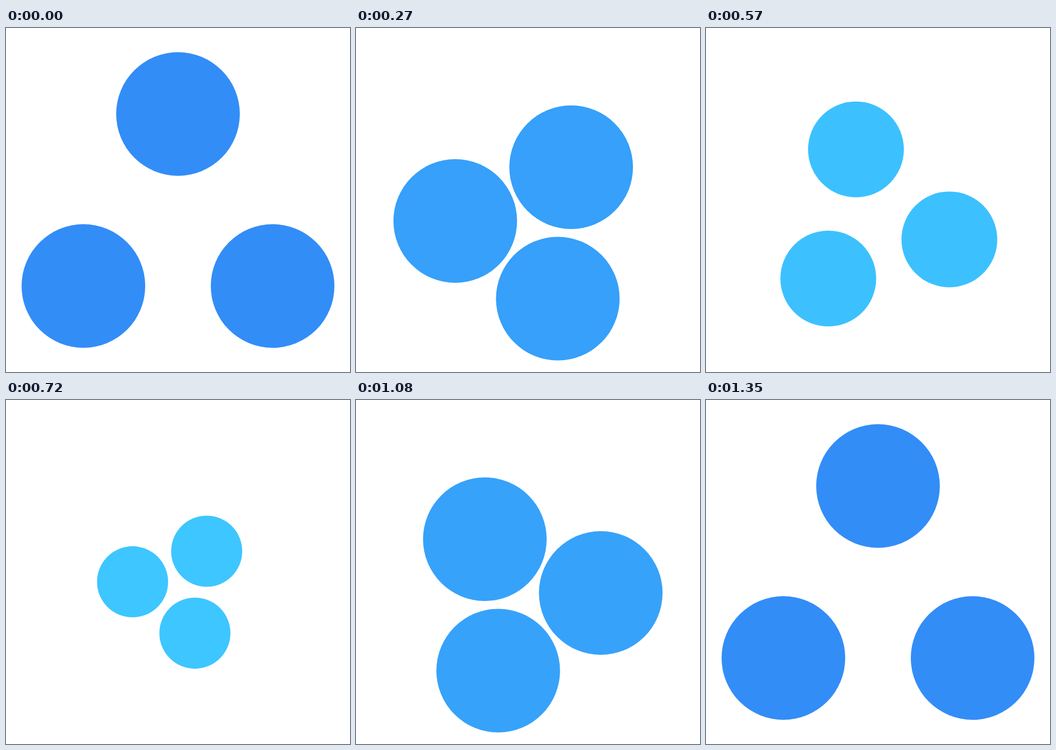
Animation, 640 px wide and 640 px high, one loop 1.38 s. Source, as an HTML page:

```html
<!DOCTYPE html>
<html lang="en">
<head>
<meta charset="utf-8">
<title>Three orbiting dots</title>
<style>
  html, body { margin: 0; width: 100%; height: 100%; overflow: hidden; background: #fff; }
  svg { display: block; width: 100%; height: 100%; }
</style>
</head>
<body>
<svg viewBox="0 0 640 640"><g id="dots"></g></svg>
<script>
const NS = 'http://www.w3.org/2000/svg';
const STEP = 30, LOOP = 1380, LEG = 15, LEGS = 3, PEAK = 23, END = LEG * LEGS;
const corners = [[320, 160], [144, 480], [496, 480]];
const darkBlue = [51, 141, 247], lightBlue = [61, 198, 255];
const group = document.getElementById('dots');

const corner = i => corners[(i + 3) % 3];
const ease = t => t * t * (3 - 2 * t);
const mix = (a, b, t) => a + (b - a) * t;

// Eased rise from `from` to PEAK and back down at `to`, 0..1..0
function pulse(frame, from, to) {
  const t = frame < PEAK ? (frame - from) / (PEAK - from) : (to - frame) / (to - PEAK);
  return ease(Math.min(1, Math.max(0, t)));
}

// Handle point on the smooth tangent through corner i
function handle(i, sign) {
  const prev = corner(i - 1), next = corner(i + 1);
  return corner(i).map((v, k) => v + sign * (next[k] - prev[k]) / 6);
}

// Curve from corner i to the next; the first and last legs have one straight end
function makeLeg(i, leg) {
  const path = document.createElementNS(NS, 'path');
  const out = leg > 0 ? handle(i, 1) : corner(i);
  const into = leg < LEGS - 1 ? handle(i + 1, -1) : corner(i + 1);
  path.setAttribute('d', `M${corner(i)} C${out} ${into} ${corner(i + 1)}`);
  return { path, length: path.getTotalLength() };
}

const dots = corners.map((_, i) => {
  const circle = document.createElementNS(NS, 'circle');
  circle.setAttribute('r', 115);
  group.append(circle);
  return { circle, legs: [0, 1, 2].map(leg => makeLeg(i + leg, leg)) };
});

function draw(now) {
  const frame = Math.min(END, Math.floor((now % LOOP) / STEP));
  const leg = Math.min(LEGS - 1, Math.floor(frame / LEG));
  const progress = ease(frame / LEG - leg);

  for (const { circle, legs } of dots) {
    const { path, length } = legs[leg];
    const { x, y } = path.getPointAtLength(length * progress);
    circle.setAttribute('cx', x);
    circle.setAttribute('cy', y);
  }

  const scale = mix(1, 0.55, pulse(frame, LEG, 2 * LEG));
  const glow = pulse(frame, 0, END);
  const color = darkBlue.map((v, k) => Math.round(mix(v, lightBlue[k], glow)));
  group.setAttribute('transform', `translate(320 320) scale(${scale}) translate(-320 -320)`);
  group.setAttribute('fill', `rgb(${color})`);
}

function tick() {
  draw(performance.now());
  requestAnimationFrame(tick);
}
tick();
</script>
</body>
</html>
```
